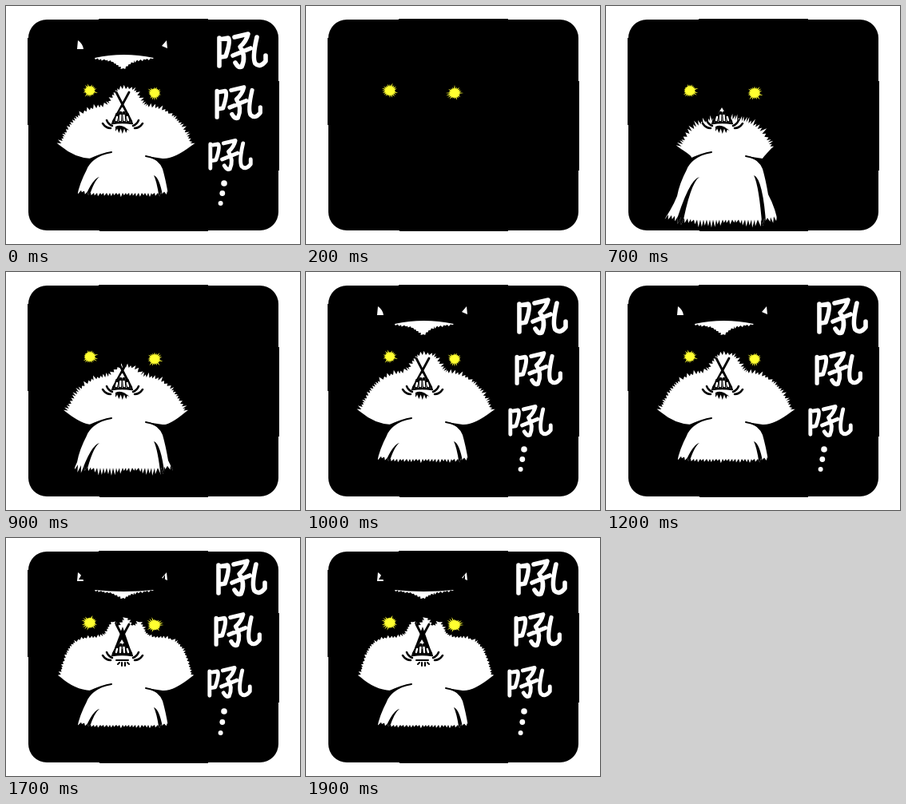
Animation of 368x298 px, one loop 2000 ms. Source, as an HTML page with a canvas:

```html
<!DOCTYPE html>
<html lang="zh">
<head>
<meta charset="utf-8">
<style>
html, body { margin: 0; width: 100%; height: 100%; overflow: hidden; background: #fff; }
canvas { display: block; }
</style>
</head>
<body>
<canvas id="stage" width="368" height="298" role="img" aria-label="吼 吼 吼 …"></canvas>
<script>
const ctx = document.getElementById('stage').getContext('2d');
const LOOP = 2000, STEP = 100, FULL = 10;
const BLACK = '#000', WHITE = '#fff', YELLOW = '#ffff30';

function random(seed) {
  return () => (seed = (seed * 16807) % 2147483647) / 2147483647;
}

const lerp = (a, b, k) => a + (b - a) * k;

// Continues a path along the points with hair on its left-hand side
function fur(path, points, length, step, rnd) {
  for (let i = 1; i < points.length; i++) {
    const [x, y] = points[i - 1], dx = points[i][0] - x, dy = points[i][1] - y;
    const size = Math.hypot(dx, dy), count = Math.max(1, Math.round(size / step));
    for (let j = 0; j < count; j++) {
      const a = j / count, b = (j + .4 + rnd() * .4) / count;
      const h = length * (.35 + rnd() * .65) / size;
      path.lineTo(x + dx * a, y + dy * a);
      path.lineTo(x + dx * b + dy * h, y + dy * b - dx * h);
    }
  }
  path.lineTo(...points[points.length - 1]);
}

function fill(shape, color) {
  ctx.fillStyle = color;
  ctx.fill(typeof shape === 'string' ? new Path2D(shape) : shape);
}

function stroke(d, color, width) {
  ctx.strokeStyle = color;
  ctx.lineWidth = width;
  ctx.stroke(new Path2D(d));
}

function mirrored(axis, paint) {
  paint();
  ctx.save();
  ctx.translate(2 * axis, 0);
  ctx.scale(-1, 1);
  paint();
  ctx.restore();
}

function drawPanel() {
  const panel = new Path2D();
  panel.roundRect(28, 17, 313, 264, 23);
  panel.rect(27, 40, 2, 109);
  panel.rect(116, 16, 137, 2);
  panel.rect(117, 280, 136, 2);
  panel.rect(340, 94, 2, 112);
  fill(panel, BLACK);
}

function drawEyes(radius, seed) {
  const rnd = random(seed);
  for (const [x, y] of [[105, 106], [186, 109]]) {
    const eye = new Path2D();
    for (let i = 0; i < 40; i++) {
      const a = i * Math.PI / 20;
      const r = radius * (i % 2 ? .62 : .75 + rnd() * .45);
      eye.lineTo(x + r * Math.cos(a), y + r * .9 * Math.sin(a));
    }
    fill(eye, YELLOW);
  }
}

function drawBody(top, bottom, length, seed) {
  const rnd = random(seed), light = new Path2D();
  fur(light, [[50, top + 8], [150, top], [230, top + 8]], 8, 5, rnd);
  fur(light, [[230, bottom - 8], [190, bottom], [110, bottom], [50, bottom - 12]], length, 4, rnd);
  ctx.save();
  ctx.clip(light);
  fill('M130 183 Q106 191 101 205 Q92 222 89 238 Q82 256 63 282 L74 278 82 282 H210 L217 280 Q213 254 203 236 Q200 218 196 204 Q192 193 176 187Z', WHITE);
  fill('M117 214 Q105 222 94 283 H84 Q103 217 117 214Z', BLACK);
  fill('M185 212 Q192 226 196 283 H201 Q197 216 185 212Z', BLACK);
  ctx.restore();
}

// A flat dome with a raised muzzle, furry over the top
function drawHead({ half, base, height, power, nose, width, ripple, length, seed }) {
  const points = [];
  for (let t = -1; t <= 1.001; t += .05) {
    const wave = 1 - ripple + ripple * Math.cos(t * 2 * Math.PI / .22);
    const muzzle = nose * Math.exp(-((t / width) ** 4)) * wave;
    points.push([150 + half * t, base - height * (1 - Math.abs(t) ** power) - muzzle]);
  }
  const left = 150 - half, right = 150 + half, head = new Path2D();
  fur(head, points, length, 3.5, random(seed));
  head.quadraticCurveTo(lerp(right, 176, .4), 192, Math.min(right - 4, 196), 191);
  head.lineTo(176, 188);
  head.lineTo(152, 200);
  head.lineTo(130, 184);
  head.lineTo(Math.max(left + 5, 106), 191);
  head.quadraticCurveTo(left + 18, 190, left, base);
  fill(head, WHITE);
  stroke('M132 183 Q120 185 105 192 M175 188 Q187 190 199 198', BLACK, 2);
}

function drawFace(calm) {
  if (calm) fill('M146 111 L158 146 H133Z', BLACK);
  stroke('M138 108 L157 145 M154 108 L134 145', BLACK, 2.8);
  fill('M145 127 L152 139 H138Z', WHITE);
  for (let i = 0; i < 4; i++) {
    const x = 138 + i * 5, tip = 133 + Math.abs(i - 1.5) * 2;
    stroke(`M${x} 144 L${lerp(x, 145, .15)} ${tip}`, BLACK, 4.5);
    stroke(`M${x} 143 L${lerp(x, 145, .15)} ${tip + 3}`, WHITE, 2.4);
  }
  stroke('M133 147 Q145 145 158 147', BLACK, 2.3);
  mirrored(146, () => stroke('M121 147 Q125 153 131 153 M126 143 Q128 148 133 150', BLACK, 2.5));

  const beard = new Path2D();
  for (let i = 0; i <= 8; i++) beard.lineTo(137 + i * 2.2, i % 2 ? 153.5 : 157 + 3 * Math.sin(i * Math.PI / 8));
  beard.quadraticCurveTo(146, 147, 137, 151);
  if (calm) stroke('M138 153 H153 M140 158 L142 156 M145 160 V156 M149 160 V156 M154 158 L152 156', BLACK, 2);
  else fill(beard, BLACK);
}

function drawCrown(calm) {
  fill('M89 54 L90 43 Q96 47 97 54Z M195 50 L201 43 202 53Z', WHITE);
  if (calm) fill('M91 52 L95 45 97 52Z M196 51 L199 46 199 52Z', BLACK);
  const patch = new Path2D();
  patch.moveTo(111, 65);
  patch.quadraticCurveTo(147, calm ? 69 : 57, 185, 65);
  fur(patch, [[185, 65], [160, 68], [147, calm ? 75 : 78], [131, 68], [111, 65]], 3, 4, random(23));
  fill(patch, WHITE);
}

const ROAR = 'M3 9 L3 44 M3 11 L14 9 Q18 11 11 32 L5 33 ' +
  'M22 8 L39 4 Q37 13 29 20 Q37 32 31 45 Q27 47 23 40 M20 31 L42 22 ' +
  'M50 8 Q44 34 48 41 Q54 47 61 38 L61 31';

function drawRoar(calm) {
  for (let i = 0; i < 3; i++) {
    const scale = 1 - i * .065;
    ctx.save();
    ctx.translate((calm ? 263 : 264) - i * i * 2.7, (calm ? 25 : 31) + i * 67);
    ctx.scale(scale, scale);
    stroke(ROAR, WHITE, 5.6);
    ctx.restore();

    const dot = new Path2D();
    dot.arc(273 - i * 2.2, calm ? 217 + i * 13.5 : 222 + i * 12.5, 3.8 - i * .4, 0, 7);
    fill(dot, WHITE);
  }
}

function drawPose(calm) {
  drawBody(170, 234, calm ? 5 : 6, 71);
  drawHead(calm
    ? { half: 82, base: 174, height: 49, power: 8, nose: 25, width: .3, ripple: .25, length: 4, seed: 37 }
    : { half: 82, base: 175, height: 49, power: 4, nose: 22, width: .22, ripple: 0, length: 6, seed: 37 });
  drawFace(calm);
  drawCrown(calm);
  drawEyes(calm ? 9.8 : 9, calm ? 19 : 53);
  drawRoar(calm);
}

// Light climbs from the feet to the face
function drawRise(step) {
  const k = (step - 5) / 5;
  if (step >= 3) drawBody(174 + Math.max(0, 5 - step) * 38, 290 - 56 * k, 10, 91);
  if (k >= 0) {
    drawHead({
      half: lerp(40, 82, k), base: lerp(181, 175, k), height: lerp(8, 49, k ** .45),
      power: 3 + k, nose: 22 * k ** 3, width: .22, ripple: 0, length: lerp(11, 6, k), seed: 43
    });
    if (step >= 7) drawFace(false);
  }
  drawEyes(9.5, step % 2 ? 29 : 67);
}

function draw(step) {
  ctx.fillStyle = WHITE;
  ctx.fillRect(0, 0, 368, 298);
  ctx.lineCap = ctx.lineJoin = 'round';
  drawPanel();
  if (step === 0 || step >= FULL) drawPose(step % 2 === 1);
  else drawRise(step);
}

const start = performance.now();
function tick() {
  draw(Math.floor((performance.now() - start) % LOOP / STEP));
  requestAnimationFrame(tick);
}
tick();
</script>
</body>
</html>
```
